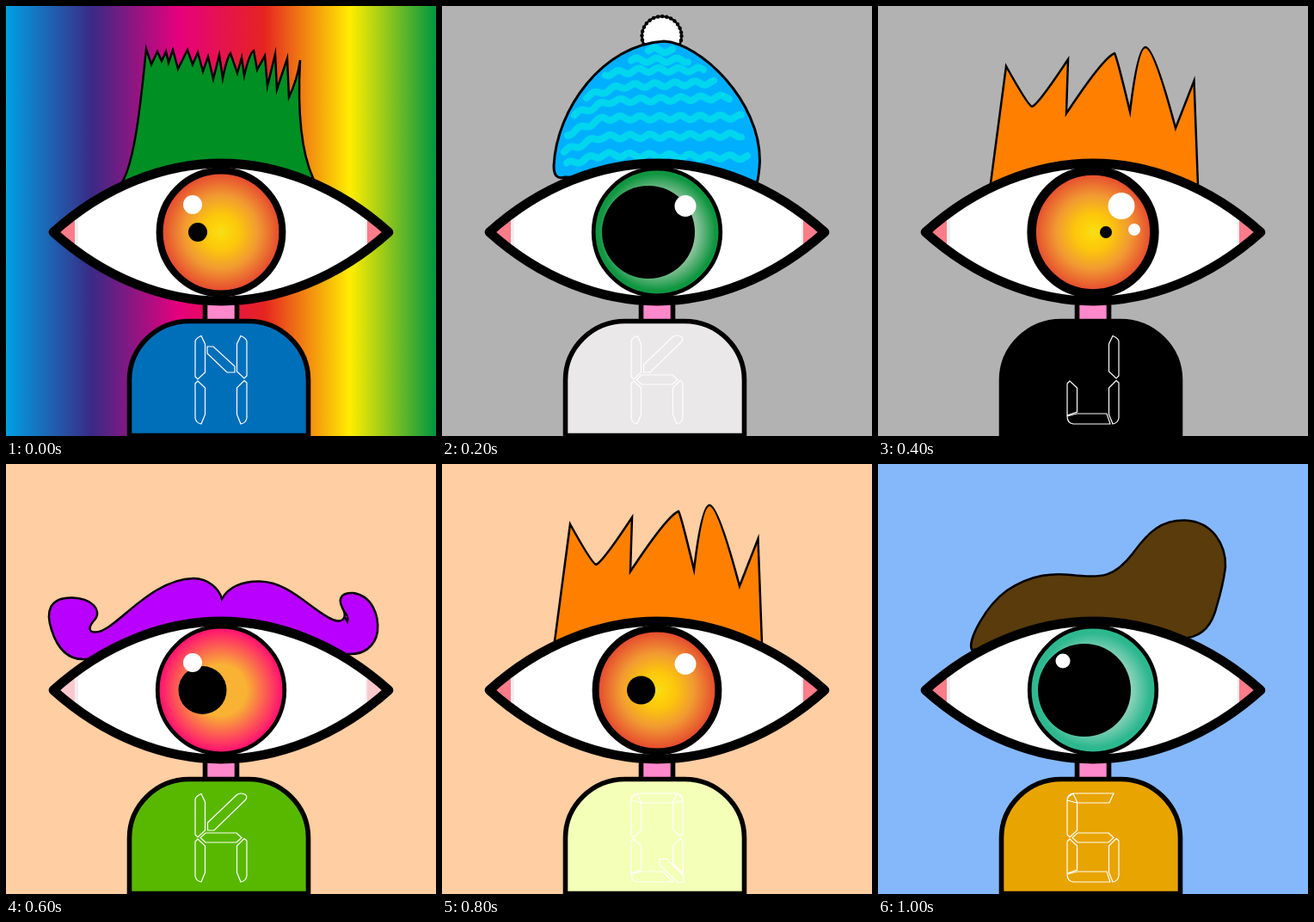
An HTML page for the animation above (1.2 s loop, 500 by 500 pixels).

```html
<!DOCTYPE html>
<html lang="en">
<head>
<meta charset="utf-8">
<title>Eye characters</title>
<style>
html, body { margin: 0; width: 100%; height: 100%; overflow: hidden; }
svg { display: block; width: 100%; height: 100%; }
</style>
</head>
<body>
<svg id="stage" viewBox="0 0 500 500"></svg>
<script>
const STEP = 200;

const path = (d, fill, stroke = 'none', width = 0, extra = '') =>
  `<path d="${d}" fill="${fill}" stroke="${stroke}" stroke-width="${width}" ${extra}/>`;
const circle = ([x, y, r], fill, stroke = 'none', width = 0, extra = '') =>
  `<circle cx="${x}" cy="${y}" r="${r}" fill="${fill}" stroke="${stroke}" stroke-width="${width}" ${extra}/>`;
const stops = list => list.map(([at, color]) =>
  `<stop offset="${at}" stop-color="${color}"/>`).join('');

// Pieces of the chest display
const segments = {
  top: 'M227 383H274L269 394H231L220 391Q220 384 227 383Z',
  wideTop: 'M227 383H273Q280 384 280 391L269 394H231L220 391Q220 384 227 383Z',
  upLeft: 'M227 383.500Q221 386 220 390V431L223 434L231.500 426V393Z',
  upRight: 'M273 383.500Q279 386 280 390V430L277 433L268.500 425V393Z',
  lowLeft: 'M223 436L220 439V479Q221 485 227 486L231.500 475V444Z',
  lowRight: 'M277 435.500L280 438V479Q279 485 273 486L268.500 475V444Z',
  hook: 'M223 436L220 439V476L231.500 472V444Z',
  bottom: 'M220 477L231 474H266L270 486H227Q220 485 220 477Z',
  middle: 'M226 434.500L232 429H268L274 434.500L268 440H232Z',
  fall: 'M234 396H241L266 419V426H257L234 404Z',
  rise: 'M234.500 417L268 385Q273 381 279 385Q281 388 278 391L242 426H234.500Z',
  shortRight: 'M277 435.500L280 438V476L268.500 464V444Z',
  shortBottom: 'M220 477L231 474H257L269 486H227Q220 485 220 477Z',
  tail: 'M253 459.500H262L281 479V486.500H274L253 466Z'
};
const glyphs = {
  N: 'upLeft upRight lowLeft lowRight fall',
  K: 'upLeft rise middle lowLeft lowRight',
  J: 'upRight lowRight hook bottom',
  Q: 'wideTop upLeft upRight hook shortRight shortBottom tail',
  6: 'top upLeft middle hook lowRight bottom'
};

// Knitted rows: start x, left droop, end x, start y, end y
const knit = [
  [240, 0, 268, 51, 52], [220, 0, 287, 63, 63], [190, 4, 304, 75, 74],
  [168, 10, 316, 95, 89], [154, 14, 335, 112, 106], [146, 18, 349, 131, 129],
  [142, 16, 349, 153, 150], [145, 12, 356, 172, 176]
];
function knitRow([x0, droop, x1, y0, y1]) {
  let d = '';
  for (let x = x0; x <= x1; x += 2) {
    const y = y0 + (y1 - y0) * (x - x0) / (x1 - x0)
      + droop * Math.max(0, 1 - (x - x0) / 42) + 2.5 * Math.sin(x * 0.27 + y0);
    d += `${d ? 'L' : 'M'}${x} ${y.toFixed(1)}`;
  }
  return path(d, 'none', '#00d7ee', 8, 'stroke-linecap="round"');
}

const hair = (d, fill) => path(d, fill, '#000', 2.5, 'stroke-miterlimit="8"');
const pom = [255.5, 35, 23];
const tops = {
  grass: hair('M135 205C150 180 157 110 163 50L169 68L176 53L181 64L186 53L189 66L194 51' +
    'L200 73L211 51L217 68L223 54L229 76L235 59L241 85L248 57L252 84Q257 60 261 55' +
    'L269 78L274 60L277 81Q283 55 288 52L292 74L301 58L304 93L313 56L315 97' +
    'L327 61L329 106Q339 85 342 63C340 100 339 160 357 200Z', '#008f23'),
  hat: circle(pom, '#fff', '#000', 2.5) +
    circle(pom, 'none', '#000', 4.5, 'stroke-dasharray="0 5.16" stroke-linecap="round"') +
    path('M143 199Q130 203 130 186C133 120 187 45 258 41C300 43 370 110 369.500 180Q369 195 366 207Z',
      '#00b0ff', '#000', 3) + knit.map(knitRow).join(''),
  spikes: hair('M131 206L149 70Q174 115 179 117Q186 115 221 62L219 125Q262 60 275 55' +
    'Q278 60 293 123Q302 48 311 48Q321 48 346 142L367.500 87L372 208Z', '#ff8000'),
  curls: hair('M92 227C72 228 60 215 53 193C46 172 50 155 77 155.500C100 156 111 170 104 180' +
    'C96 189 95 195 103 195.500C125 198 165 134 218 133C235 133 248 145 251 157' +
    'C258 143 275 136 295 136.500C330 137 355 170 380 181C393 186 397 177 391 167' +
    'C385 155 392 149 404 150C425 153 434 175 432 195C429 213 415 222 398 221Z', '#b900ff') +
    path('M394 172Q399 178 397 184L394 178', 'none', '#000', 2),
  quiff: hair('M109 216C104 205 125 165 150 147C180 127 205 127 225 129C260 133 275 132 297 103' +
    'C315 78 330 65 357 65.500C390 67 405 95 404 120C402 135 400 145 394 165C388 190 375 200 360 202Z',
    '#5a3b0c')
};

const irises = {
  amber: [[0, '#f3df1c'], [0.12, '#fcd50c'], [0.3, '#fcc60c'], [0.6, '#f19a32'], [1, '#e4412f']],
  green: [[0.4, '#c4e2cc'], [0.65, '#7fbf93'], [0.92, '#0f9640']],
  rose: [[0.4, '#f9b233'], [0.95, '#ff176e']],
  teal: [[0.4, '#bfe6d6'], [0.65, '#7dcfb3'], [0.9, '#2db88f']]
};
const rainbow = [[0, '#009fe3'], [0.2, '#3a2a85'], [0.4, '#e6007e'],
  [0.6, '#e52421'], [0.8, '#ffed00'], [1, '#009640']];

const left = [217, 231, 11], right = [283, 232.5, 12.5];
const people = [
  { back: 'url(#rainbow)', top: 'grass', shirt: '#006fba', glyph: 'N',
    iris: 'amber', size: 71.4, rim: 8, pupil: [223, 263, 11], glints: [left] },
  { back: '#b2b2b2', top: 'hat', shirt: '#eae8e9', glyph: 'K',
    iris: 'green', size: 73.8, rim: 4.7, pupil: [240, 263, 54], glints: [right] },
  { back: '#b2b2b2', top: 'spikes', shirt: '#000', glyph: 'J',
    iris: 'amber', size: 71.4, rim: 10.5, pupil: [265, 263, 7], glints: [[283, 232.5, 15.5], [298, 260, 7]] },
  { back: '#ffcea2', top: 'curls', shirt: '#58b800', glyph: 'K', corner: '#fbc9cd',
    iris: 'rose', size: 73.8, rim: 4.7, pupil: [228.5, 263, 28], glints: [left] },
  { back: '#ffcea2', top: 'spikes', shirt: '#f4ffb8', glyph: 'Q',
    iris: 'amber', size: 71.4, rim: 8, pupil: [231.5, 263, 16.5], glints: [right] },
  { back: '#85b8fa', top: 'quiff', shirt: '#e8a400', glyph: '6',
    iris: 'teal', size: 73.8, rim: 4.7, pupil: [240, 263, 54], glints: [[215, 229, 8.5]] }
];

const eye = 'M55 263C115 209 185 183 250 183S385 209 445 263C385 317 315 343 250 343S115 317 55 263Z';
const body = 'M143.500 499.500V435C143.500 397 175 366.500 213 366.500H282C320 366.500 351.500 397 351.500 435V499.500Z';

function draw(p) {
  return `<defs>
    <linearGradient id="rainbow">${stops(rainbow)}</linearGradient>
    <radialGradient id="iris">${stops(irises[p.iris])}</radialGradient>
    <clipPath id="lids"><path d="${eye}"/></clipPath></defs>` +
    path('M0 0H500V500H0Z', p.back) +
    path('M231.500 340H268.500V367H231.500Z', '#ff88ca', '#000', 5.6) +
    path(body, p.shirt, '#000', 5.6) +
    path(glyphs[p.glyph].split(' ').map(s => segments[s]).join(''), 'none', '#fff', 1.2) +
    tops[p.top] +
    path(eye, '#fff') +
    '<g clip-path="url(#lids)">' +
    path('M80 200H84V330H80ZM418 200H420V330H418Z', '#eee') +
    path('M50 200H80V330H50ZM420 200H450V330H420Z', p.corner || '#fc7c8a') + '</g>' +
    path(eye, 'none', '#000', 10.8, 'stroke-linejoin="round"') +
    circle([250, 263, p.size], 'url(#iris)', '#000', p.rim) +
    circle(p.pupil, '#000') +
    p.glints.map(g => circle(g, '#fff')).join('');
}

const stage = document.getElementById('stage');
let start, shown = -1;
function tick(now) {
  start ??= now;
  const i = Math.floor((now - start) / STEP) % people.length;
  if (i !== shown) stage.innerHTML = draw(people[shown = i]);
  requestAnimationFrame(tick);
}
requestAnimationFrame(tick);
</script>
</body>
</html>
```
